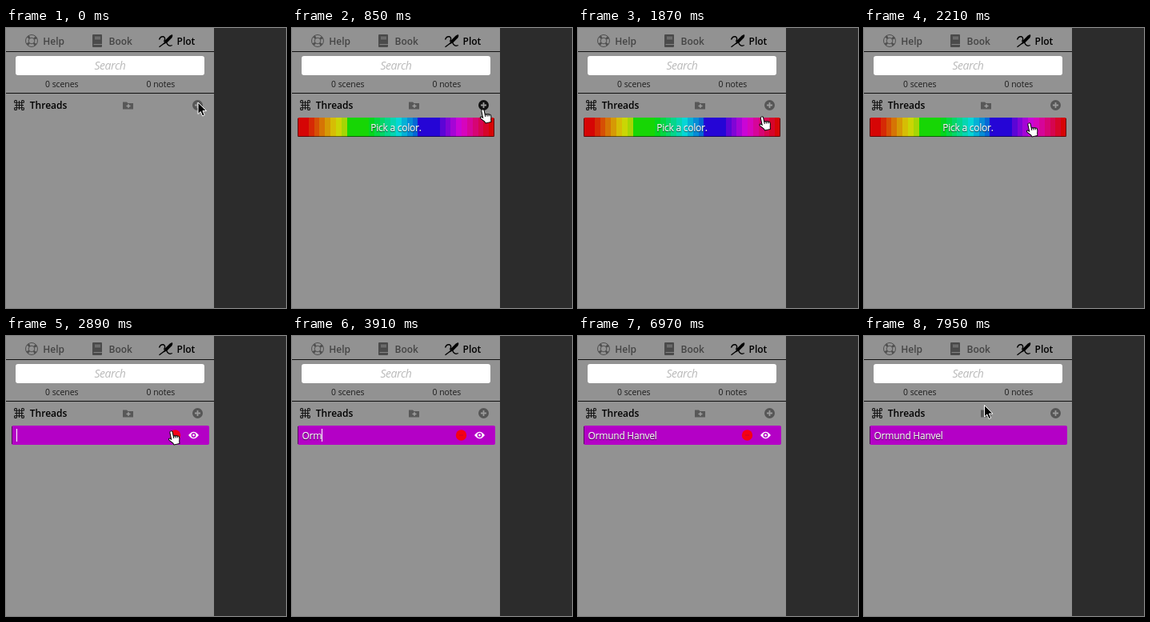
An HTML page that plays this animation: 350x350 px, repeating every 8000 ms.

```html
<!DOCTYPE html>
<html lang="en">
<head>
<meta charset="utf-8">
<title>Thread list</title>
<style>
  html, body { margin: 0; width: 100%; height: 100%; overflow: hidden; background: #2c2c2c; }
  svg { display: block; width: 350px; height: 350px; }
  text { font: 12px "Open Sans", "Noto Sans", sans-serif; white-space: pre; }
  .tab { font-weight: 600; }
  .count { font-size: 10.4px; fill: #1c1c1c; }
  .search { font-size: 14px; font-style: italic; letter-spacing: -.4px; fill: #bababa; }
  .light { fill: #fff; stroke: #fff; stroke-width: .2px; letter-spacing: -.25px; text-shadow: 0 1px 1px #0008; }
  .line { fill: none; }
  .edge { fill: none; stroke: #0008; }
  #stripes { clip-path: inset(0 round 2px); shape-rendering: crispEdges; }
</style>
</head>
<body>
<svg viewBox="0 0 350 350">
  <rect width="260" height="350" fill="#929292"/>
  <path d="M0 29.5H260M0 81.5H260" stroke="#111"/>

  <!-- tabs -->
  <g class="line" stroke="#505050">
    <circle cx="32" cy="16" r="7.5"/>
    <circle cx="32" cy="16" r="3.8"/>
    <circle cx="32" cy="16" r="5.6" stroke-width="3.6" stroke-dasharray="2.6 6.2" stroke-dashoffset="-3.1"/>
  </g>
  <rect x="108" y="8" width="12" height="16" rx="1" fill="#4b4b4b"/>
  <path d="M111 11.5H118M111 13.5H118M109.5 20.5H120" stroke="#858585"/>
  <path d="M208 8.3Q209 10 207.3 12.2L201.5 18.3 196.8 20.5 198.5 15.8 204.5 9.8Q206.5 8 208 8.3Z"/>
  <path class="line" d="M191.5 14.5Q193 10 197 10.8 200 12.5 197.5 17M198.5 18.5L191.5 23.8M200.5 18Q203 24 207.8 21.5" stroke="#000" stroke-width="1.4"/>
  <text class="tab" x="46.3" y="20.8" fill="#444">Help</text>
  <text class="tab" x="128.5" y="20.8" fill="#444">Book</text>
  <text class="tab" x="213.5" y="20.8">Plot</text>

  <rect x="12" y="35" width="236" height="24" rx="3" fill="#fff"/>
  <text class="search" x="130" y="52" text-anchor="middle">Search</text>
  <text class="count" x="49" y="74">0 scenes</text>
  <text class="count" x="175.5" y="74">0 notes</text>

  <!-- thread header -->
  <path class="line" stroke="#111" stroke-width="1.1" d="M13.3 90.5V102.5M16.5 91V102M19.7 90.5V102.5M10.5 93.3H22.5M11 96.5H22M10.5 99.7H22.5
    M13.3 90.5H11.5Q10.5 90.5 10.5 93.3M19.7 90.5H21.5Q22.5 90.5 22.5 93.3M13.3 102.5H11.5Q10.5 102.5 10.5 99.7M19.7 102.5H21.5Q22.5 102.5 22.5 99.7"/>
  <text class="tab" x="29.8" y="101">Threads</text>
  <path d="M146 92.5H151L152.5 94H159V101.5H146Z" fill="#585858"/>
  <path d="M150.5 97.5H155.5M153 95V100" stroke="#a0a0a0" stroke-width="1.3"/>
  <circle id="add" cx="239.5" cy="96.5" r="6.5"/>
  <path d="M236 96.5H243M239.5 93V100" stroke="#9a9a9a" stroke-width="1.8"/>

  <g id="picker">
    <g id="stripes"></g>
    <path class="edge" d="M7.5 113V135.5H252.5V113"/>
    <text class="light" x="130" y="129" text-anchor="middle">Pick a color.</text>
  </g>

  <g id="thread">
    <rect x="7" y="112" width="247" height="24" rx="2" fill="#b400c6"/>
    <path class="edge" d="M7.5 113V135"/>
    <text class="light" id="name" x="12.5" y="129"></text>
    <rect id="caret" y="116" width="1" height="16" fill="#fff"/>
    <g id="tools">
      <circle cx="211.5" cy="124" r="6.7" fill="#f50014"/>
      <path d="M209 124H214" stroke="#c40030"/>
      <path d="M228 124Q234.5 115.5 241 124 234.5 132.5 228 124Z" fill="#fff"/>
      <circle cx="234.5" cy="124" r="2.9" fill="#b400c6"/>
      <circle cx="234.5" cy="124" r="1.4" fill="#fff"/>
    </g>
  </g>

  <path id="arrow" d="M0 0V14.5L3.3 11.5 5.6 17 8.2 15.9 5.9 10.6H10.5Z" stroke="#fff"/>
  <g id="hand">
    <path transform="rotate(-12)" d="M-2 1.5A1.7 1.7 0 0 1 1.4 1.5V6.3L3.8 6.6 6 7.2 8 8.2C8.6 10 8.2 12.5 7.4 14.3L7 17.3H0L-1 15 -4.5 11C-6 9 -4.5 7.8 -3.2 8.8L-2 10Z
      M1.4 6.3V9.5M3.8 6.6V9.5M6 7.2V9.8" fill="#fff" stroke="#000"/>
  </g>
</svg>
<script>
const LOOP = 8000;
const THREAD_NAME = "Ormund Hanvel";

// Typing: [time, letters shown]
const typing = [[0, 0], [3400, 1], [3570, 2], [3910, 3], [4080, 4], [4250, 5], [4420, 6],
  [4760, 8], [4930, 9], [5270, 10], [5440, 11], [5780, 12], [5950, 13]];

// Pointer: [time, shape, x, y]
const pointer = [[0, "arrow", 240, 93], [170, "hand", 238, 99], [340, "hand", 238.5, 102],
  [1870, "hand", 230, 111], [2040, "hand", 215, 117], [2210, "hand", 206.5, 119],
  [3400, "none"], [7650, "arrow", 190, 139], [7950, "arrow", 150.5, 86.5]];

const el = id => document.getElementById(id);
const show = (id, on) => { el(id).style.display = on ? "" : "none"; };
const latest = (keys, t) => keys.findLast(key => key[0] <= t);
const between = (t, start, end) => t >= start && t < end;

// Hue bands from red to red, with the greens and blues each merged into one
const BANDS = 36;
const bandHue = i => i > 8 && i < 13 ? 115 : i > 21 && i < 26 ? 249 : Math.max(0, i - 1) * 360 / (BANDS - 2);
el("stripes").innerHTML = Array.from({ length: BANDS }, (_, i) => {
  const width = 246 / BANDS;
  return `<rect x="${7 + i * width}" y="112" width="${width}" height="24" fill="hsl(${bandHue(i)} 95% 43%)"/>`;
}).join("");

function draw(t) {
  el("add").setAttribute("fill", between(t, 170, 1870) ? "#111" : "#565656");
  show("picker", between(t, 850, 2890));
  show("thread", t >= 2890);
  show("tools", t < 7650);
  show("caret", t < 6800);

  el("name").textContent = THREAD_NAME.slice(0, latest(typing, t)[1]);
  el("caret").setAttribute("x", Math.round(12.5 + el("name").getComputedTextLength()));

  const [, shape, x, y] = latest(pointer, t);
  for (const id of ["arrow", "hand"]) {
    show(id, id === shape);
    if (id === shape) el(id).setAttribute("transform", `translate(${x} ${y})`);
  }
}

const start = performance.now();
function frame() {
  draw((performance.now() - start) % LOOP);
  requestAnimationFrame(frame);
}
frame();
</script>
</body>
</html>
```
